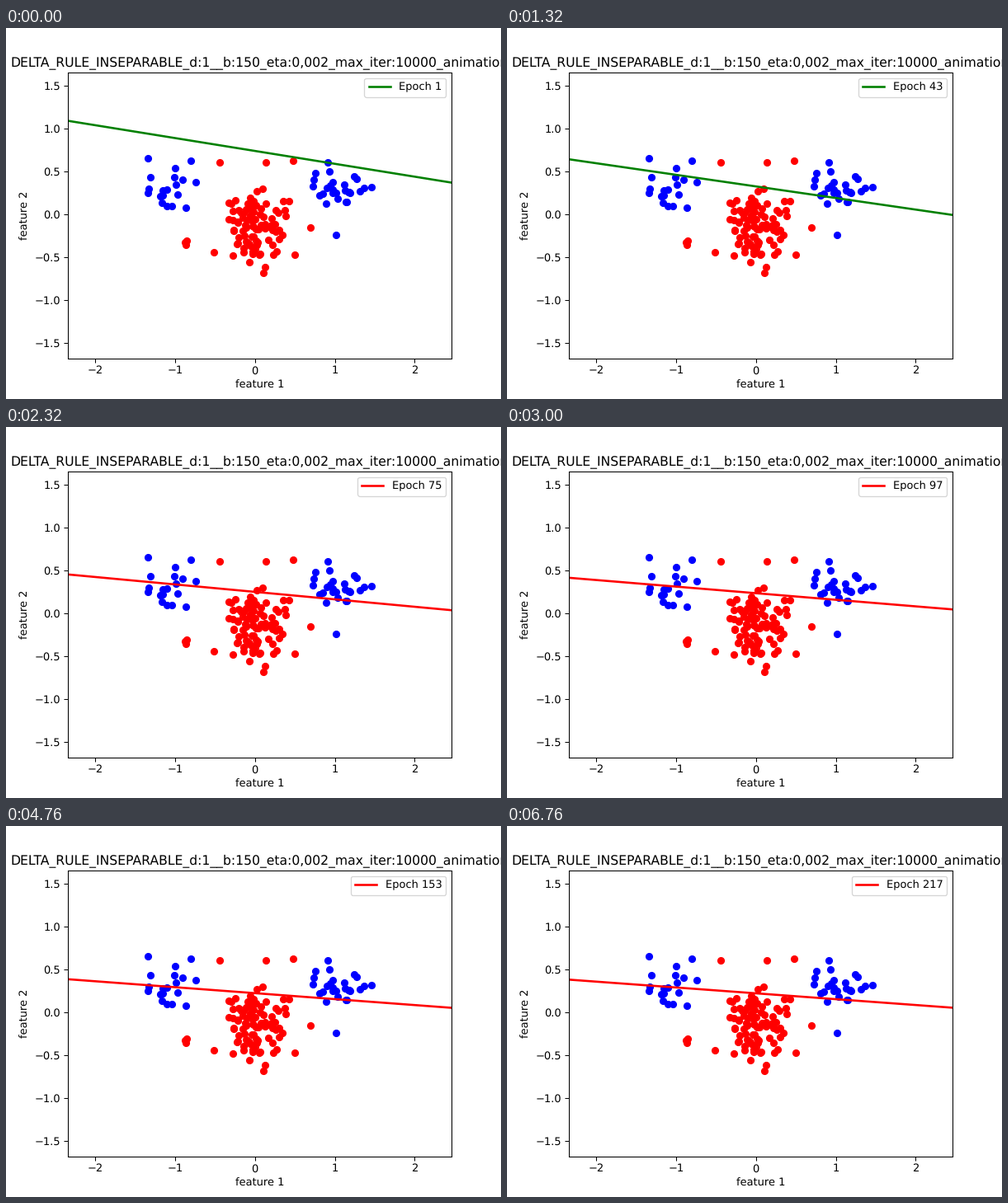
Animation, 600 px wide and 450 px high, one loop 6800 ms. Source, as a matplotlib script:

```python
import numpy as np
import matplotlib.pyplot as plt
from matplotlib.animation import FuncAnimation

FRAMES, INTERVAL = 170, 40
EPOCHS_PER_FRAME = 1.28
X_LIM, Y_LIM = (-2.34, 2.46), (-1.677, 1.649)

rng = np.random.default_rng(4)


def cluster(center, spread, count, reach=2.1):
    """Normal scatter around a center, cut off at `reach` deviations."""
    z = rng.normal(size=(count * 4, 2))
    z = z[np.hypot(*z.T) < reach][:count]
    return center + z * spread


def boundary(epoch):
    """Heights of the decision line at both x limits.

    Batch gradient descent: each weight decays to its optimum at its own
    rate, the slow y weight dragging the other two along.
    """
    n = epoch - 1
    lag = 1.26 * 0.969 ** n
    w0 = -0.219 + 0.013 * lag + 0.394 * 0.7 ** n
    w1 = 0.0679 + 0.067 * lag - 0.1913 * 0.875 ** n
    w2 = 1 - lag
    return [-(w0 + w1 * x) / w2 for x in X_LIM]


plt.rcParams["text.hinting"] = "none"
fig, ax = plt.subplots(figsize=(6.4, 4.8), dpi=93.75)

# Two blue clouds flank a red one; the outermost points are fixed
blue = np.vstack([
    cluster((-1.04, 0.25), (0.18, 0.18), 17),
    cluster((0.98, 0.27), (0.2, 0.17), 25),
    [(-1.34, 0.65), (-0.8, 0.62), (0.91, 0.6), (1.46, 0.31), (1.01, -0.24)]])
red = np.vstack([
    cluster((0.02, -0.11), (0.23, 0.25), 90),
    cluster((-0.88, -0.33), (0.02, 0.03), 3),
    [(-0.44, 0.6), (0.14, 0.6), (0.48, 0.62), (0.69, -0.16),
     (0.5, -0.47), (0.11, -0.68), (-0.51, -0.44)]])
for points, color in ((blue, "blue"), (red, "red")):
    ax.plot(*points.T, "o", color=color)

line, = ax.plot(X_LIM, boundary(1), color="green", lw=2, label="Epoch 1")
ax.set(xlim=X_LIM, ylim=Y_LIM, xlabel="feature 1", ylabel="feature 2")
ax.set_title("DELTA_RULE_INSEPARABLE_d:1__b:150_eta:0,002"
             "_max_iter:10000_animation")
legend = ax.legend(loc="upper right")
label, sample = legend.get_texts()[0], legend.get_lines()[0]


def update(i):
    epoch = 1 + int(EPOCHS_PER_FRAME * i + 0.5)
    color = "green" if epoch <= 70 else "red"
    line.set_ydata(boundary(epoch))
    line.set_color(color)
    sample.set_color(color)
    label.set_text(f"Epoch {epoch}")
    return line, legend


anim = FuncAnimation(fig, update, frames=FRAMES, interval=INTERVAL,
                     repeat=True, repeat_delay=0)
plt.show()
```
